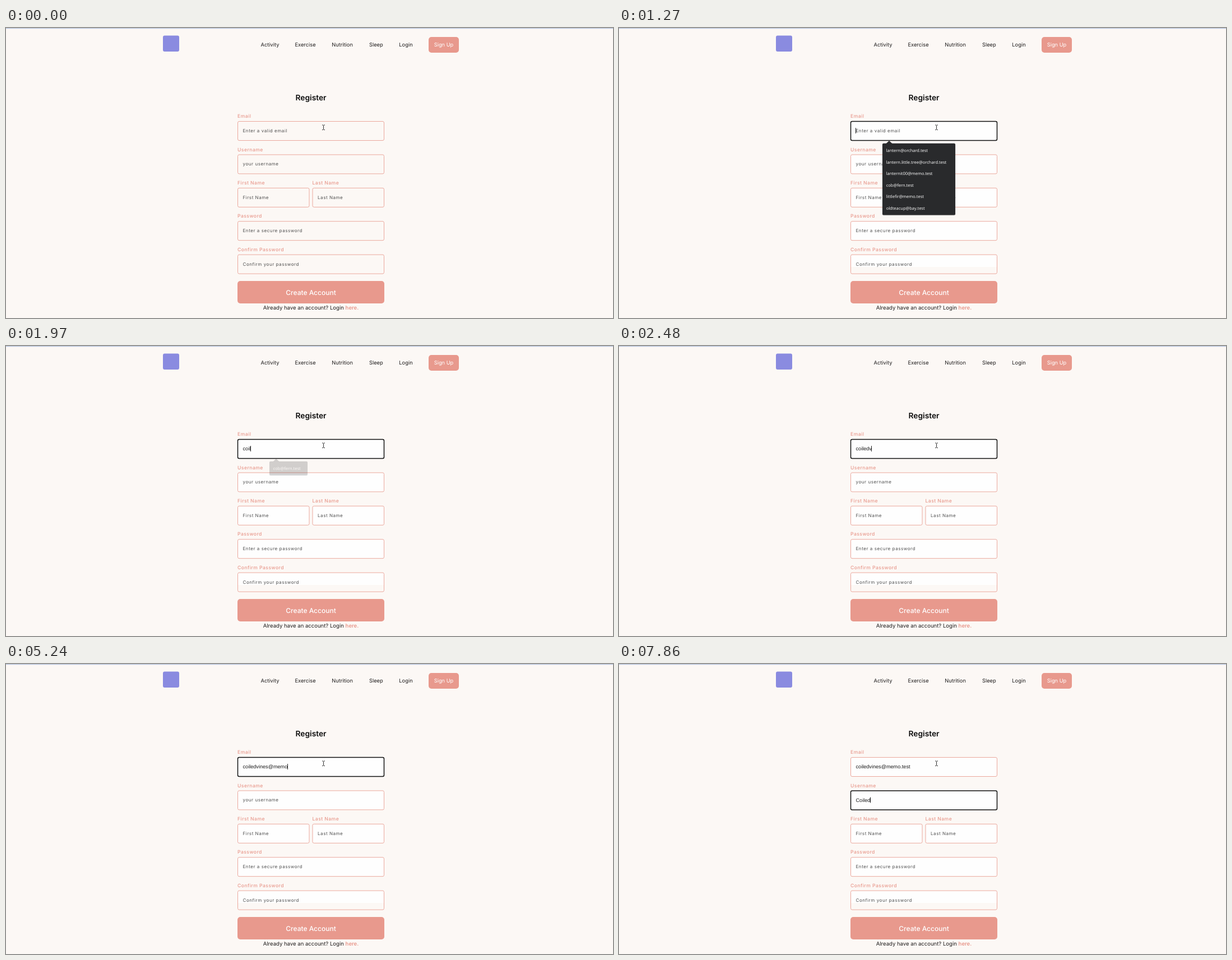
Animation of 1083x517 px, one loop 8 s. Source, as an HTML page:

```html
<!DOCTYPE html>
<html lang="en">
<head>
<meta charset="utf-8">
<title>Register</title>
<style>
  html, body { margin: 0; width: 100%; height: 100%; overflow: hidden; background: #fcf8f5; }
  svg { display: block; text-rendering: geometricPrecision; }
  text { font: 9.3px Inter, "Open Sans", sans-serif; fill: #1f1d1d; }
  .mid { text-anchor: middle; }
  .title { font-size: 13.8px; font-weight: 600; fill: #0d0d0d; }
  .label { font-size: 8.6px; font-weight: 500; letter-spacing: .45px; fill: #e8998d; }
  .hint { font-size: 8px; letter-spacing: .56px; fill: #505050; }
  .typed { font: 9.13px "Liberation Sans", Arial, sans-serif; fill: #1c1c1c; }
  .option { font: 7.5px "Open Sans", "Noto Sans", sans-serif; fill: #fff; }
  .white { fill: #fff; }
  .create { font-size: 12px; font-weight: 500; }
  .note { font-size: 9.55px; }
  .link { font-weight: 600; fill: #e8998d; }
  .coral { fill: #e8998d; }
  .box { fill: none; stroke: #eba89d; stroke-width: 1; }
  .focus { fill: none; stroke: #111; stroke-width: 1.5; }
</style>
</head>
<body>
<svg id="stage" width="1083" height="517" viewBox="0 0 1083 517"></svg>
<script>
const LOOP = 8000;
const stage = document.getElementById('stage');

function add(tag, attrs, content = '', parent = stage) {
  const el = document.createElementNS('http://www.w3.org/2000/svg', tag);
  for (const key in attrs) el.setAttribute(key, attrs[key]);
  el.textContent = content;
  return parent.appendChild(el);
}
const text = (x, y, str, cls = '', parent) => add('text', { x, y, class: cls }, str, parent);
const rect = (x, y, width, height, rx, more, parent) =>
  add('rect', { x, y, width, height, rx, ...more }, '', parent);
const show = (el, on) => el.setAttribute('visibility', on ? 'visible' : 'hidden');

// Header
rect(0, 0, 1083, 1.2, 0, { fill: '#b5c4de' });
rect(280, 13.5, 29, 28.5, 3, { fill: '#8a8be0' });
[[471, 'Activity'], [534, 'Exercise'], [600, 'Nutrition'], [660.3, 'Sleep'], [713.5, 'Login']]
  .forEach(([x, str]) => text(x, 33.3, str, 'mid'));
rect(754, 16, 54, 28, 5, { class: 'coral' });
text(781, 33.4, 'Sign Up', 'mid white');

// Form
text(544, 129.2, 'Register', 'mid title');
const TOP = 166.5, STEP = 59.4, LEFT = 413.5, FULL = 261, HALF = 127.5;
const fields = [
  [0, LEFT, FULL, 'Email', 'Enter a valid email'],
  [1, LEFT, FULL, 'Username', 'your username'],
  [2, LEFT, HALF, 'First Name', 'First Name'],
  [2, LEFT + 133.5, HALF, 'Last Name', 'Last Name'],
  [3, LEFT, FULL, 'Password', 'Enter a secure password'],
  [4, LEFT, FULL, 'Confirm Password', 'Confirm your password']
].map(([row, x, w, label, hint]) => {
  const y = TOP + row * STEP;
  text(x - .5, y - 6.4, label, 'label');
  const fill = rect(x, y, w, row === 4 ? 259.5 - 4 * STEP + .0 : 34, row === 4 ? 0 : 2.5, { fill: '#fefefe' });
  const box = rect(x, y, w, 34, 2.5, { class: 'box' });
  return { y, fill, box, hint: text(x + 9, y + 19.5, hint, 'hint'), typed: text(422.5, y + 19.7, '', 'typed') };
});
const caret = rect(422, 178, 1, 10, 0, { fill: '#222' });

rect(413, 451, 262, 40, 5, { class: 'coral' });
text(544, 475.6, 'Create Account', 'mid white create');
const note = text(544, 501.6, 'Already have an account? Login ', 'mid note');
add('tspan', { class: 'link' }, 'here.', note);

// Suggestion list
const options = [
  'lantern@orchard.test', 'lantern.little.tree@orchard.test', 'lanternit00@memo.test',
  'cob@fern.test', 'littlefir@memo.test', 'oldteacup@bay.test'
];
function makeList(items, width, height) {
  const g = add('g', {});
  rect(469.5, 205.5, width + 1, height + 1, 2.5, { fill: '#000', opacity: .15 }, g);
  add('path', { d: 'M476.5 206L482 201L487.5 206Z', fill: '#292a2c' }, '', g);
  rect(470, 205.7, width, height, 2, { fill: '#292a2c' }, g);
  items.forEach((str, i) => text(476.7, 221 + i * 20.6, str, 'option', g));
  return g;
}
const longList = makeList(options, 130, 127.8);
const shortList = makeList([options[3]], 68, 25);

// Text pointer
add('path', {
  d: 'M564 173H566M567 173H569M566.5 173.5V181M564 181.5H566M567 181.5H569',
  stroke: '#333', fill: 'none'
});

// Each entry: [time, value from then on]
const EMAIL = 'coiledvines@memo.test', USER = 'Coiled';
const emailKeys = [
  [0, 0], [1550, 1], [1670, 2], [1820, 3], [1970, 4], [2210, 5], [2330, 6], [2480, 7],
  [3070, 8], [3190, 9], [3310, 10], [3580, 11], [4140, 12], [4600, 13], [4720, 14],
  [4990, 15], [5240, 16], [5520, 17], [5670, 18], [5790, 19], [5940, 21]
];
const userKeys = [[0, 0], [6900, 1], [7180, 2], [7460, 4], [7710, 5], [7860, 6]];
const caretKeys = [[0, 0], [280, 1], [710, 0], [1270, 1], [6750, 0], [6900, 1]];
const listFade = [[0, 0], [1550, 1], [1820, .6], [1970, .2], [2090, 0]];
const at = (keys, t) => keys.findLast(([start]) => start <= t)[1];

function type(field, str) {
  field.typed.textContent = str;
  show(field.hint, !str);
}

function draw(now) {
  const t = now % LOOP;
  const active = t < 280 ? -1 : t < 6190 ? 0 : 1;
  type(fields[0], EMAIL.slice(0, at(emailKeys, t)));
  type(fields[1], USER.slice(0, at(userKeys, t)));
  fields.forEach((f, i) => {
    show(f.fill, active >= 0);
    f.box.setAttribute('class', i === active ? 'focus' : 'box');
  });

  show(caret, at(caretKeys, t));
  if (active >= 0) {
    const f = fields[active];
    const len = f.typed.textContent ? f.typed.getComputedTextLength() : 0;
    caret.setAttribute('x', Math.floor(422.5 + len));
    caret.setAttribute('y', active ? 237.5 : 178);
  }

  show(longList, t >= 280 && t < 1550);
  shortList.setAttribute('opacity', at(listFade, t));
  requestAnimationFrame(draw);
}
requestAnimationFrame(draw);
</script>
</body>
</html>
```
